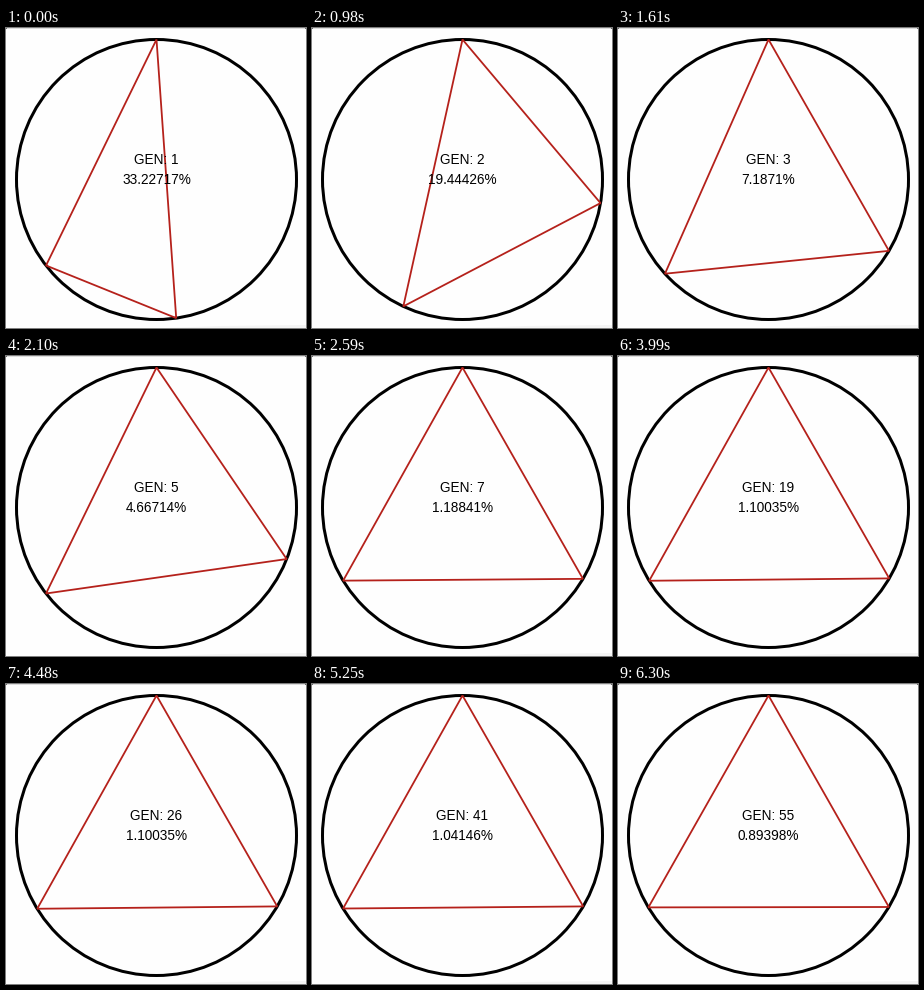
A matplotlib script that plays this animation: 300 px wide and 300 px high, repeating every 6.58 s.

```python
import numpy as np
import matplotlib.pyplot as plt
from matplotlib.animation import FuncAnimation
from matplotlib.patches import Circle, Polygon, Rectangle

SIZE, DPI = 300, 100
FRAMES, STEP = 94, 70
PX = 72 / DPI
CX, CY, R = 150.5, 151.5, 140

# First tick of generations 1 to 12; later ones speed up between knots.
STARTS = [0, 13, 21, 27, 30, 35, 37, 40, 42, 44, 46, 48]
RUSH_TICKS, RUSH_GENS = [51, 64, 75, 78], [13, 26, 41, 55]

# Best candidate: first generation, left and right arc in degrees, error.
BEST = [
    (1, 127.90, 171.91, "33.22717%"),
    (2, 155.00, 99.70, "19.44426%"),
    (3, 132.30, 120.64, "7.1871%"),
    (4, 127.90, 111.60, "4.66714%"),
    (6, 121.50, 120.64, "1.18841%"),
    (16, 121.55, 120.43, "1.10035%"),
    (30, 121.44, 120.43, "1.04146%"),
    (55, 120.90, 120.71, "0.89398%"),
]


def generation(tick):
    if tick < RUSH_TICKS[0]:
        return int(np.searchsorted(STARTS, tick, side="right"))
    return int(np.interp(tick, RUSH_TICKS, RUSH_GENS) + 1e-6)


def on_circle(deg):
    """Point at a clockwise angle from the top."""
    a = np.radians(deg)
    return CX + R * np.sin(a), CY - R * np.cos(a)


fig = plt.figure(figsize=(SIZE / DPI, SIZE / DPI), dpi=DPI, facecolor="#fefefe")
ax = fig.add_axes([0, 0, 1, 1])
ax.set(xlim=(0, SIZE), ylim=(SIZE, 0))
ax.axis("off")

# Faint window edges
ax.add_patch(Rectangle((0, 0), SIZE, 1, fc="#dcdcdc", lw=0))
for x in (0, SIZE - 1):
    ax.add_patch(Rectangle((x, 0), 1, 1, fc="#666666", lw=0))
ax.add_patch(Polygon([(160, 300), (215, 298), (300, 297), (300, 300)],
                     fc="#f4f4f4", lw=0))

ax.add_patch(Circle((CX, CY), R, fill=False, ec="black", lw=3 * PX))
triangle = ax.add_patch(Polygon([(CX, CY)] * 3, fill=False, ec="#b5211b",
                                lw=1.8 * PX, joinstyle="bevel"))


def label(y):
    return ax.text(CX, y, "", ha="center", va="baseline", color="black",
                   family="Liberation Sans", size=13.6 * PX)


gen_text, err_text = label(136.5), label(156.5)


def update(tick):
    gen = generation(tick)
    _, left, right, err = [b for b in BEST if b[0] <= gen][-1]
    triangle.set_xy([on_circle(a) for a in (0, right, -left)])
    gen_text.set_text(f"GEN: {gen}")
    err_text.set_text(err)
    return triangle, gen_text, err_text


anim = FuncAnimation(fig, update, frames=FRAMES, interval=STEP,
                     repeat=True, repeat_delay=0)
plt.show()
```
